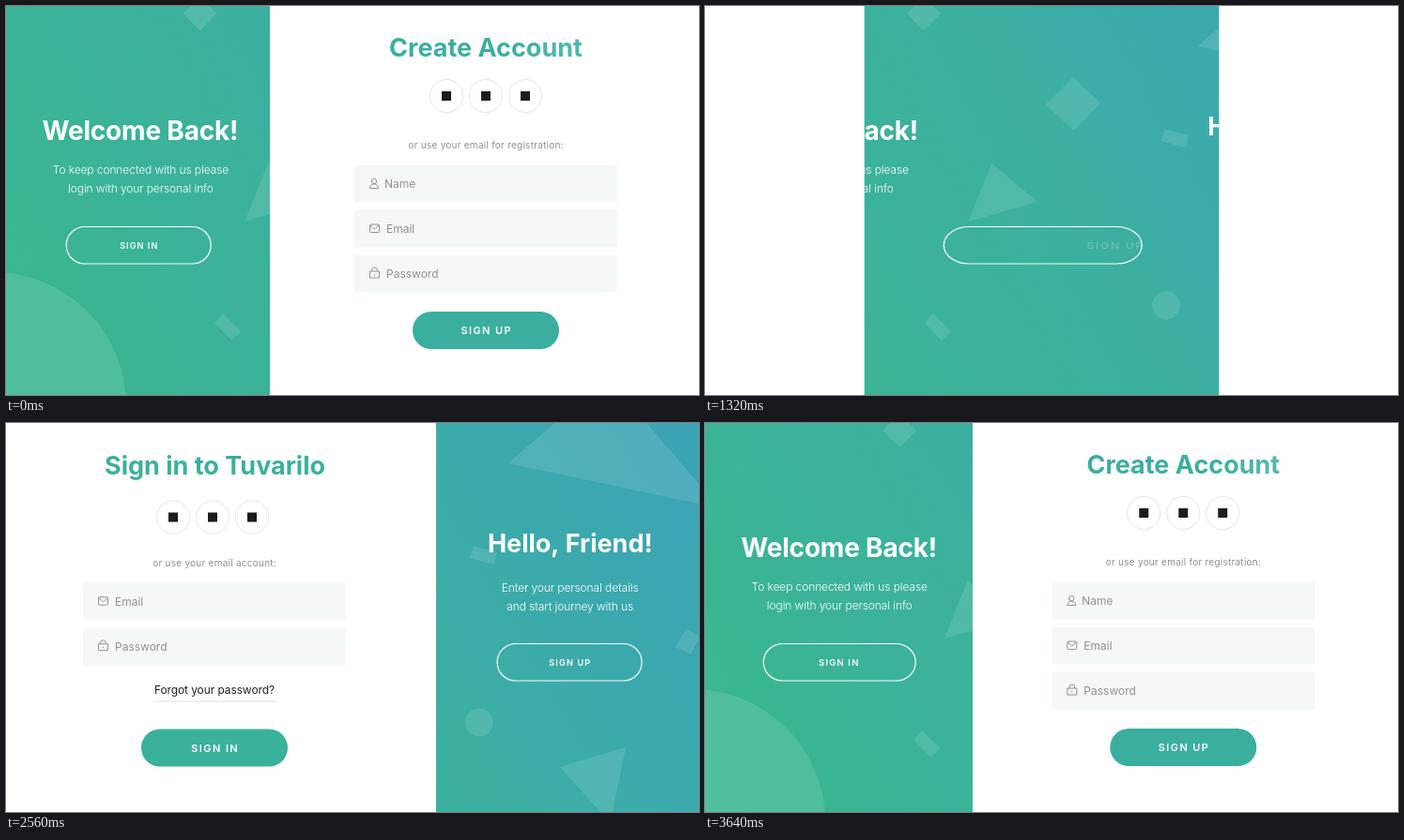
These frames come from a looping animation (738x415 px, 3.68 s). An HTML page with a canvas:

```html
<!DOCTYPE html>
<html lang="en">
<head>
<meta charset="utf-8">
<title>Sliding sign-in panel</title>
<style>
html, body { margin: 0; width: 100%; height: 100%; overflow: hidden; background: #fff; }
canvas { display: block; width: 738px; height: 415px; }
</style>
</head>
<body>
<canvas id="stage" width="738" height="415"></canvas>
<script>
const W = 738, H = 415, LOOP = 3680, STEP = 40;
const ctx = document.getElementById('stage').getContext('2d');
const FONT = 'Inter, "Open Sans", sans-serif';
const clamp = v => Math.max(0, Math.min(1, v));

// Monotone cubic curve through [time, value] points.
function curve(pts) {
  const n = pts.length;
  const slope = i => (pts[i + 1][1] - pts[i][1]) / (pts[i + 1][0] - pts[i][0]);
  const tan = pts.map((p, i) => {
    if (i === 0 || i === n - 1) return 0;
    const a = slope(i - 1), b = slope(i);
    return a * b <= 0 ? 0 : 2 * a * b / (a + b);
  });
  return t => {
    if (t <= pts[0][0]) return pts[0][1];
    if (t >= pts[n - 1][0]) return pts[n - 1][1];
    let i = 0;
    while (t > pts[i + 1][0]) i++;
    const [t0, v0] = pts[i], [t1, v1] = pts[i + 1];
    const h = t1 - t0, u = (t - t0) / h, u2 = u * u, u3 = u2 * u;
    return v0 * (2 * u3 - 3 * u2 + 1) + tan[i] * h * (u3 - 2 * u2 + u)
      + v1 * (3 * u2 - 2 * u3) + tan[i + 1] * h * (u3 - u2);
  };
}

// Progress of the panel's two edges: 0 is parked left, 1 is parked right.
const leftEdge = curve([[860, 0], [920, .003], [1120, .083], [1360, .44], [1560, .823],
  [1840, .988], [2080, 1], [2600, 1], [2720, .975], [2880, .847], [3160, .395],
  [3280, .13], [3360, .05], [3540, .004], [3620, 0]]);
const rightEdge = curve([[400, 0], [800, .008], [920, .04], [1120, .2], [1480, .884],
  [1560, .956], [1760, .991], [2040, 1], [2660, 1], [2880, .967], [3160, .58],
  [3360, .18], [3480, .06], [3640, .009], [3680, .007]]);
const buttonGrowth = curve([[0, 0], [4, 8], [54, 32], [84, 49], [140, 80]]);

function text(str, x, y, size, weight, color, align = 'center', space = 0) {
  ctx.font = `${weight} ${size}px ${FONT}`;
  ctx.letterSpacing = space + 'px';
  ctx.textAlign = align;
  ctx.fillStyle = color;
  ctx.fillText(str, align === 'center' ? x + space / 2 : x, y);
}

function pill(x, y, w, h) {
  ctx.beginPath();
  ctx.roundRect(x, y, w, h, h / 2);
}

function poly(dx, ...p) {
  ctx.beginPath();
  for (let i = 0; i < p.length; i += 2) ctx.lineTo(p[i] + dx, p[i + 1]);
  ctx.closePath();
  ctx.fill();
}

function disc(x, y, r) {
  ctx.beginPath();
  ctx.arc(x, y, r, 0, 7);
  ctx.fill();
}

const icons = {
  Name(x, y) {
    ctx.arc(x + 5, y - 2.5, 2.7, 0, 7);
    ctx.moveTo(x + .5, y + 5);
    ctx.bezierCurveTo(x + .5, y - 1, x + 9.5, y - 1, x + 9.5, y + 5);
    ctx.closePath();
  },
  Email(x, y) {
    ctx.roundRect(x + .5, y - 4.5, 10, 8.5, 1);
    ctx.moveTo(x + 1, y - 3.5);
    ctx.lineTo(x + 5.5, y + .5);
    ctx.lineTo(x + 10, y - 3.5);
  },
  Password(x, y) {
    ctx.rect(x + .5, y - 2.5, 10, 7);
    ctx.moveTo(x + 2.5, y - 2.5);
    ctx.arc(x + 5.5, y - 3.5, 3, Math.PI, 0);
    ctx.lineTo(x + 8.5, y - 2.5);
    ctx.moveTo(x + 5.5, y + .5);
    ctx.lineTo(x + 5.5, y + 2);
  }
};

function field(label, x, y, textX) {
  ctx.fillStyle = '#f4f8f7';
  ctx.fillRect(x, y, 280, 39.5);
  ctx.strokeStyle = '#929292';
  ctx.lineWidth = 1;
  ctx.beginPath();
  icons[label](x + 16, y + 19.5);
  ctx.stroke();
  text(label, x + textX, y + 24, 12, 400, '#8e9190', 'left');
}

function socials(cx, cy) {
  for (const dx of [-42, 0, 42]) {
    ctx.strokeStyle = '#e5e5e5';
    ctx.lineWidth = 1;
    ctx.beginPath();
    ctx.arc(cx + dx, cy, 17.6, 0, 7);
    ctx.stroke();
    ctx.fillStyle = '#1c1c1c';
    ctx.fillRect(cx + dx - 5, cy - 5, 10, 10);
  }
}

function solidButton(label, cx, y, color, shine) {
  ctx.save();
  pill(cx - 78, y, 156, 40);
  ctx.fillStyle = color;
  ctx.fill();
  if (shine) {
    ctx.clip();
    ctx.fillStyle = 'rgba(255,255,255,.1)';
    poly(cx, 38, 40, 80, 27, 80, 42);
  }
  ctx.restore();
  text(label, cx, y + 24, 11, 600, '#fff', 'center', 1.4);
}

function registerForm(cx) {
  const g = ctx.createLinearGradient(cx + 30, 0, cx + 85, 0);
  g.addColorStop(0, '#3aaf9f');
  g.addColorStop(1, '#52b7aa');
  text('Create Account', cx, 54, 27, 700, g);
  socials(cx, 96);
  text('or use your email for registration:', cx, 152, 10, 400, '#8f8f8f', 'center', .25);
  field('Name', cx - 140, 170, 32);
  field('Email', cx - 140, 218, 34);
  field('Password', cx - 140, 266, 34);
  solidButton('SIGN UP', cx, 326, '#3aaf9f', true);
}

function loginForm(cx) {
  text('Sign in to Tuvarilo', cx + .5, 54.5, 27, 700, '#3ab19b');
  socials(cx - 2, 100.5);
  text('or use your email account:', cx, 152.5, 10, 400, '#8f8f8f', 'center', .25);
  field('Email', cx - 140, 170.7, 34);
  field('Password', cx - 140, 218.7, 34);
  text('Forgot your password?', cx, 289, 12, 400, '#222', 'center', -.1);
  ctx.fillStyle = '#e2e2e2';
  ctx.fillRect(cx - 65, 296.5, 130, 1);
  solidButton('SIGN IN', cx, 326.5, '#3ab19b', false);
}

const sky = ctx.createLinearGradient(0, H, W, 0);
[[0, '#39b78e'], [.5, '#3cb09f'], [.8, '#3ba8af'], [1, '#3ba3b5']]
  .forEach(([at, c]) => sky.addColorStop(at, c));

function ghostButton(cx, w, l, r) {
  const s = w / 155;
  ctx.save();
  ctx.translate(cx, 0);
  ctx.scale(s, 1);
  pill(-77, 235.5, 154, 39.5);
  ctx.save();
  ctx.scale(1 / s, 1);
  ctx.strokeStyle = '#fff';
  ctx.lineWidth = 1.2;
  ctx.stroke();
  ctx.restore();
  ctx.clip();
  const a = 1 - l;
  ctx.globalAlpha = clamp(1 - (r - .2) / .35);
  text('SIGN IN', -110 * r, 258.5, 9, 600, '#fff', 'center', 1.1);
  ctx.globalAlpha = clamp(1 - (a - .2) / .55);
  text('SIGN UP', 70 * a + 30 * a * a, 258.5, 9, 600, '#fff', 'center', 1.2);
  ctx.restore();
}

function panel(l, r, shift) {
  const x0 = 458 * l, x1 = 281 + 457 * r, b = 1 - r;
  ctx.save();
  ctx.beginPath();
  ctx.rect(x0, 0, x1 - x0, H);
  ctx.clip();
  ctx.fillStyle = sky;
  ctx.fillRect(0, 0, W, H);

  // Decorations drift at different rates.
  const near = 35 * (1 - Math.exp(-r / .42));
  const hello = 25 * (1 - Math.exp((l - 1) / .28));
  ctx.fillStyle = 'rgba(255,255,255,.115)';
  disc(-14 + .23 * near, 426, 142);
  poly(near, 206.5, -10, 224.5, 8, 206.5, 26, 188.5, 8);
  poly(near, 279, 168, 328, 209, 254, 230);
  poly(.45 * near, 231, 328, 250, 347, 240.5, 357, 222, 338);
  poly(-18 * b, 399.5, 76, 428.5, 103.5, 400, 133, 370.5, 105);
  poly(-19 * b, 498, 131.5, 523, 138, 520, 151, 493, 144);
  disc(504 - 31 * b, 319.5, 15);
  poly(-25 * b, 590, 367, 660, 346, 643.6, 427);
  poly(-50 * b, 724, 220, 740, 228, 729, 247, 713, 239);
  poly(-.47 * hello, 535, 43, 760, 91, 640, -49);

  const wx = 143.5 - 38 * shift;
  text('Welcome Back!', wx - .5, 143, 28, 700, '#fff', 'center', -.2);
  text('To keep connected with us please', wx, 178.5, 12, 300, '#fff', 'center', -.1);
  text('login with your personal info', wx, 198.5, 12, 300, '#fff', 'center', -.1);
  const hx = 600.7 + hello;
  text('Hello, Friend!', hx, 137.5, 27, 700, '#fff');
  text('Enter your personal details', hx, 179.5, 12, 300, '#fff', 'center', -.1);
  text('and start journey with us', hx, 199.5, 12, 300, '#fff', 'center', -.1);

  const growth = buttonGrowth(Math.max(0, x1 - x0 - 281));
  ghostButton((x0 + x1) / 2 + .7 + 1.4 * l, 155 + growth, l, r);
  ctx.restore();
}

function draw(t) {
  const l = leftEdge(t), r = rightEdge(t);
  const shift = r - (.36 - .25 * r) * r * (1 - r);
  ctx.fillStyle = '#fff';
  ctx.fillRect(0, 0, W, H);
  const cx = 511 - 289 * shift;
  if (r < .58) registerForm(cx);
  else loginForm(cx);
  panel(l, r, shift);
}

const start = performance.now();
function tick() {
  const t = (performance.now() - start) % LOOP;
  draw(Math.floor(t / STEP) * STEP);
  requestAnimationFrame(tick);
}
tick();
</script>
</body>
</html>
```
